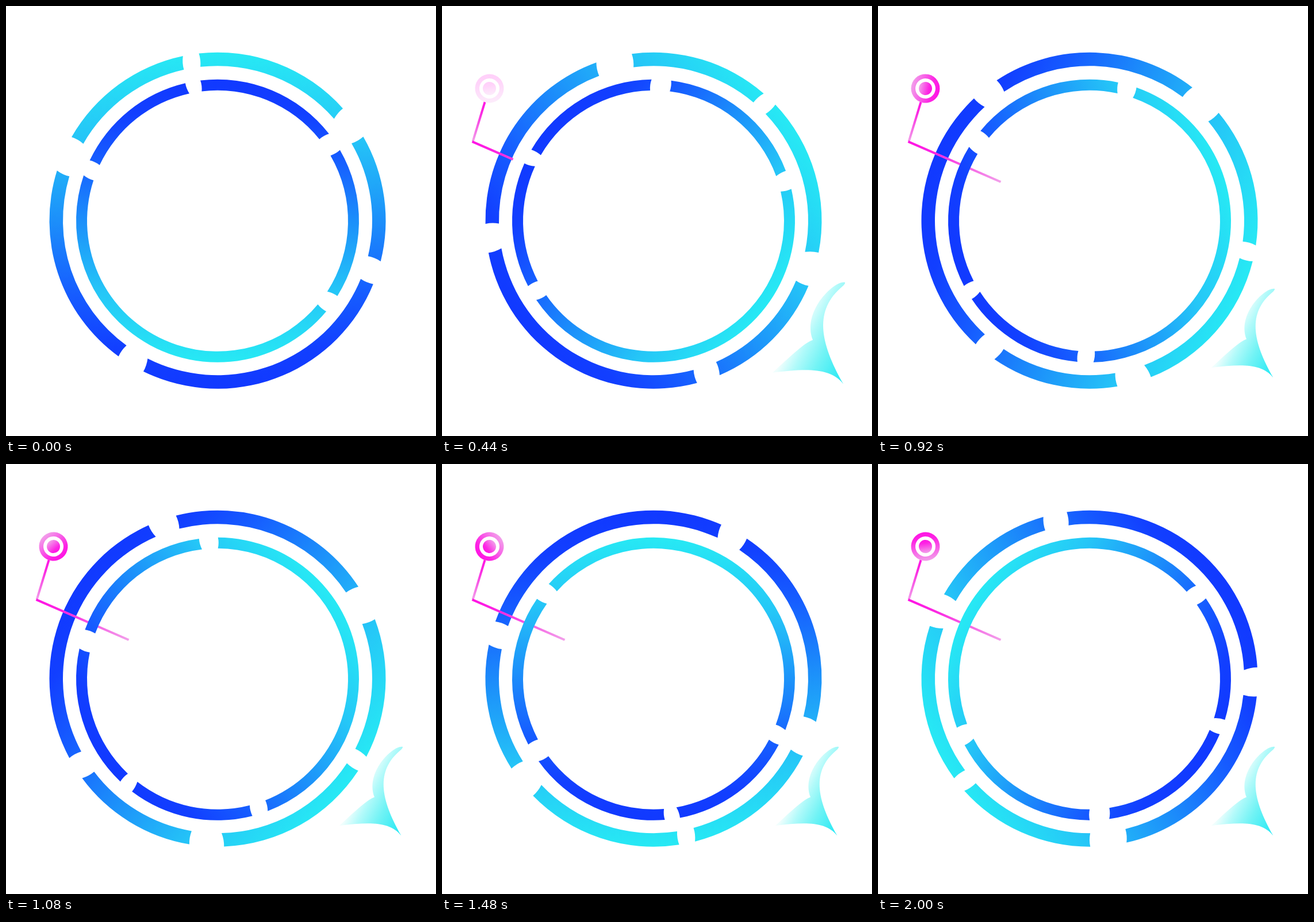
Write an HTML page with a canvas that moves like this. It is 748x748 px and loops after 2040 ms.

```html
<!DOCTYPE html>
<html lang="en">
<head>
<meta charset="utf-8">
<title>Rotating rings</title>
<style>
html, body { margin: 0; width: 100%; height: 100%; overflow: hidden; background: #fff; }
canvas { display: block; width: 748px; height: 748px; }
</style>
</head>
<body>
<canvas id="stage" width="748" height="748"></canvas>
<script>
const ctx = document.getElementById('stage').getContext('2d');
const LOOP = 2040, STEP = 40, SPIN = 0.12;
const RAD = Math.PI / 180;
const CYAN = '#27e9f4', BLUE = '#1139ff', PINK = '#ff14e4', PALE = '#f2a0ea';
const TILT = 0.35, BITE = 0.25;

// Gaps are [centre, width] in degrees clockwise from the top.
const outerRing = {
  x: 368, y: 373.2, r1: 292.5, r0: 269, top: -1,
  gaps: [[-9.3, 5.85], [54.3, 11.5], [107.95, 8.5], [211.3, 9.55], [293.35, 12.8]]
};
const innerRing = {
  x: 368, y: 373.8, r1: 246, r0: 227, top: 1,
  gaps: [[55.8, 8.3], [126.1, 7.35], [291.9, 6.85], [350.1, 5.85]]
};

const span = (t, a, b) => Math.max(0, Math.min(1, (t - a) / (b - a)));
const polar = (deg, r) => [r * Math.sin(deg * RAD), -r * Math.cos(deg * RAD)];

function gradient(x0, y0, x1, y1, stops) {
  const g = ctx.createLinearGradient(x0, y0, x1, y1);
  stops.forEach(([at, color]) => g.addColorStop(at, color));
  return g;
}

function drawRing({ x, y, r0, r1, top, gaps }, turn) {
  const mid = (r0 + r1) / 2;
  ctx.save();
  ctx.translate(x, y);
  ctx.rotate(turn * RAD);
  ctx.fillStyle = gradient(0, top * r1, 0, -top * r1, [
    [0, CYAN], [0.25, '#25c6f7'], [0.5, '#1c8ffa'], [0.72, '#165cff'], [0.88, '#123fff'], [1, BLUE]
  ]);
  gaps.forEach(([centre, width], i) => {
    const n = (i + 1) % gaps.length;
    const [nextCentre, nextWidth] = gaps[n];
    const from = centre + width / 2;
    const to = nextCentre - nextWidth / 2;
    const tilt = n % 2 ? TILT : -TILT;
    ctx.beginPath();
    ctx.arc(0, 0, r1, (from - 90) * RAD, (to - tilt - 90) * RAD);
    ctx.quadraticCurveTo(...polar(to - 2 * BITE, mid), ...polar(to + tilt, r0));
    ctx.arc(0, 0, r0, (to + tilt - 90) * RAD, (from - 90) * RAD, true);
    ctx.quadraticCurveTo(...polar(from + 2 * BITE, mid), ...polar(from, r1));
    ctx.fill();
  });
  ctx.restore();
}

function drawLine(x0, y0, x1, y1, part) {
  if (!part) return;
  ctx.strokeStyle = gradient(x0, y0, x1, y1, [[0, PINK], [0.3, '#fb28e2'], [1, PALE]]);
  ctx.lineWidth = 4;
  ctx.beginPath();
  ctx.moveTo(x0, y0);
  ctx.lineTo(x0 + (x1 - x0) * part, y0 + (y1 - y0) * part);
  ctx.stroke();
}

function disc(r, fill, alpha = 1) {
  ctx.globalAlpha = alpha;
  ctx.fillStyle = fill;
  ctx.beginPath();
  ctx.arc(0, 0, r, 0, 2 * Math.PI);
  ctx.fill();
}

function drawTarget(t) {
  const alpha = span(t, 400, 600);
  if (!alpha) return;
  const shade = r => gradient(0, -r, 0, r, [[0, PINK], [0.25, '#fd24e4'], [1, PALE]]);
  ctx.save();
  ctx.translate(82.5, 143.5);
  ctx.rotate(((t - 440) / 1560 * 360 - 8) * RAD);
  disc(25, '#fff');
  disc(25, shade(25), alpha);
  disc(17.5, '#fff');
  disc(11.5, shade(11.5), alpha);
  ctx.restore();
}

// Pops in past full size, then settles.
function drawFin(t) {
  const scale = t < 400
    ? 1.195 * span(t, 200, 400)
    : 1 + 0.195 * Math.pow(1 - span(t, 400, 600), 1.35);
  if (!scale) return;
  ctx.save();
  ctx.translate(613, 569);
  ctx.scale(scale, scale);
  ctx.translate(-613, -569);
  ctx.fillStyle = gradient(588, 592, 684, 642, [
    [0, '#fff'], [0.13, '#effefd'], [0.33, '#b2fafa'], [0.6, '#72f3f5'], [1, CYAN]
  ]);
  ctx.beginPath();
  ctx.moveTo(690, 492);
  ctx.bezierCurveTo(675, 488, 624, 535, 641, 579.5);
  ctx.bezierCurveTo(629, 583, 605, 606, 580, 629);
  ctx.bezierCurveTo(630, 623, 668, 621, 687.5, 646.5);
  ctx.bezierCurveTo(651, 582, 643, 534, 686, 498);
  ctx.quadraticCurveTo(690.5, 494, 690, 492);
  ctx.fill();
  ctx.restore();
}

function draw(t) {
  ctx.fillStyle = '#fff';
  ctx.fillRect(0, 0, 748, 748);
  drawRing(outerRing, SPIN * t);
  drawLine(75.5, 164, 53.7, 235.5, span(t, 240, 340));
  drawLine(52.5, 235.8, 213.5, 306, span(t, 345, 560));
  drawRing(innerRing, -SPIN * t);
  drawTarget(t);
  drawFin(t);
}

const start = performance.now();
function tick() {
  const t = (performance.now() - start) % LOOP;
  draw(Math.floor(t / STEP) * STEP);
  requestAnimationFrame(tick);
}
tick();
</script>
</body>
</html>
```
